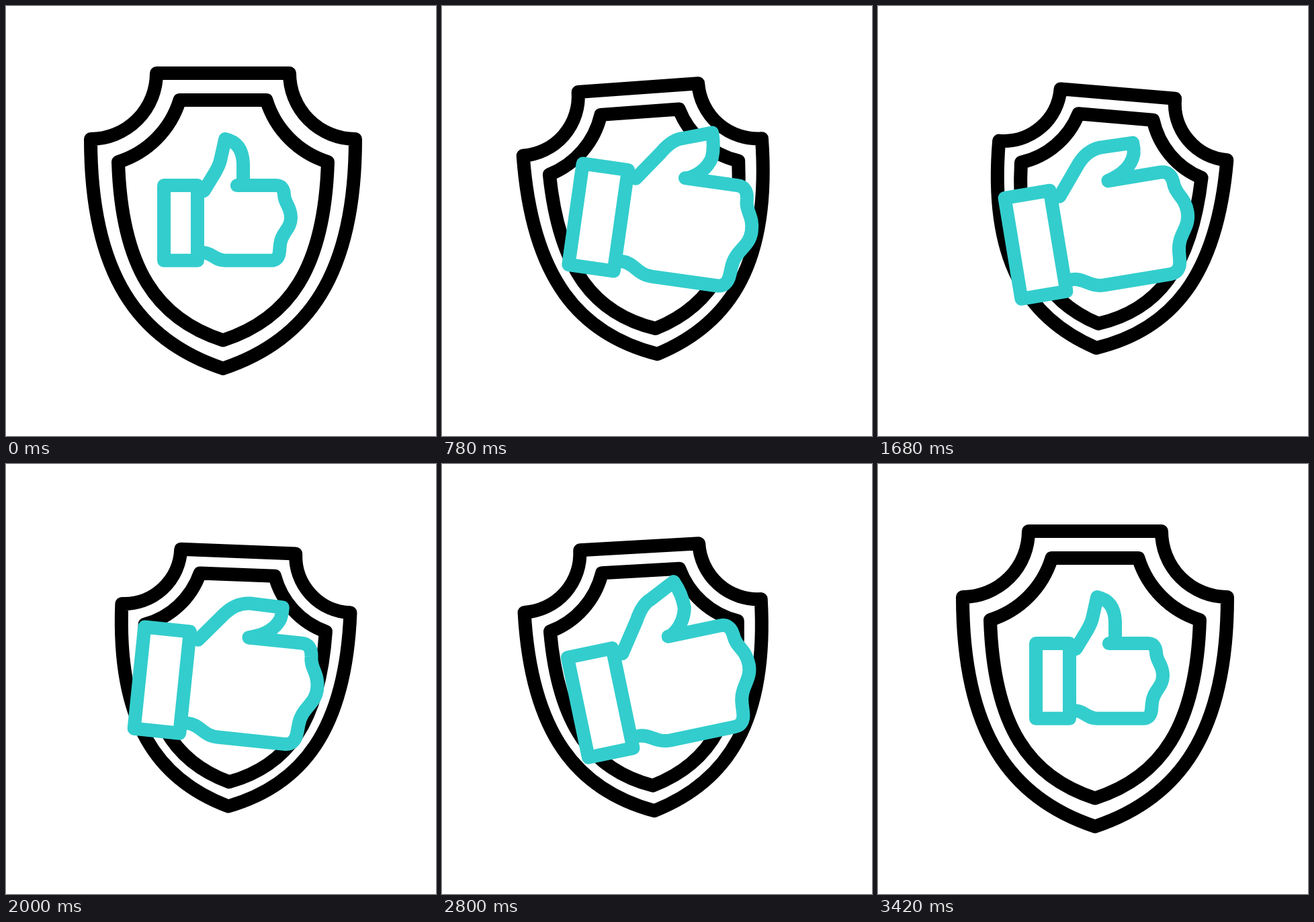
An HTML page with a canvas for the animation above (3600 ms loop, 640 by 640 pixels).

```html
<!DOCTYPE html>
<html lang="en">
<head>
<meta charset="utf-8">
<title>Shield and thumbs up</title>
<style>
html, body { margin: 0; width: 100%; height: 100%; overflow: hidden; background: #fff; }
canvas { display: block; width: 640px; height: 640px; }
</style>
</head>
<body>
<canvas id="stage" width="640" height="640"></canvas>
<script>
const ctx = document.getElementById('stage').getContext('2d');
const LOOP = 3600, STEP = 20, BEGIN = 210, END = 3420;
const TEAL = '#33cdcd', BIG = 1.36;

const mix = (a, b, u) => a + (b - a) * u;
const clamp = u => Math.min(1, Math.max(0, u));
const ease = u => { u = clamp(u); return u * u * (3 - 2 * u); };

// Rises from 0 to 1 at the beginning and falls back before the end.
const ramp = (t, rise, fall) => ease((t - BEGIN) / rise) * ease((END - t) / fall);

// Eases through evenly spaced turning points.
function sway(t, start, gap, ...stops) {
  const k = Math.max(0, (t - start) / gap), last = stops.length - 1;
  const i = Math.min(Math.floor(k), last - 1);
  return mix(stops[i], stops[i + 1], ease(k - i));
}

// Only the geometry is transformed, so the line width stays the same.
function place(path, x, y, deg, scale) {
  const out = new Path2D();
  out.addPath(path, new DOMMatrix().translate(x, y).rotate(deg).scale(scale));
  return out;
}

const shield = new Path2D(
  'M-99-220H99A98 98 0 0 0 197-122C197 81 125 178 0 219.5C-125 178-197 81-197-122A98 98 0 0 0-99-220Z' +
  'M-64.5-180H64.5A139 139 0 0 0 156-88C151 71 98 146 0 177.5C-98 146-151 71-156-88A139 139 0 0 0-64.5-180Z');

const cuff = new Path2D('M-149-71H-81V81H-149Z');

// b = 0: thumb straight up, b = 1: thumb bent forward.
function palm(b) {
  const p = new Path2D(), arc = 4 * b * (1 - b), dx = 8 * b;
  const pt = (x0, y0, x1, y1, bx = 0, by = 0) =>
    [mix(x0, x1, b) + bx * arc, mix(y0, y1, b) + by * arc];
  // thumb
  p.moveTo(-68, -60);
  p.lineTo(...pt(-45.6, -97, -32.5, -103, 0, -3));
  p.quadraticCurveTo(...pt(-37.5, -110.6, -17, -121, 0, -9), ...pt(-34.8, -121.5, 3.5, -122, 0, -9));
  p.lineTo(...pt(-25, -165, 52.5, -121, 5, -13));
  p.quadraticCurveTo(...pt(10, -158, 53, -112), ...pt(11.5, -115, 51, -104));
  p.quadraticCurveTo(...pt(11.5, -90, 42, -80), ...pt(11.5, -71, 7, -71.5));
  // fingers
  p.lineTo(dx - 1, -71);
  p.lineTo(dx + 78, -71);
  p.quadraticCurveTo(dx + 93, -71, dx + 94.4, -53);
  p.bezierCurveTo(dx + 94.4, -34, dx + 108, -30, dx + 108, -6);
  p.bezierCurveTo(dx + 108, 18, dx + 88, 24, dx + 86, 50);
  p.lineTo(dx + 85, 62);
  p.quadraticCurveTo(dx + 83.5, 81, dx + 68, 81);
  p.lineTo(-24, 81);
  p.bezierCurveTo(-46, 81, -52, 65, -70, 65);
  return p;
}

function drawShield(t) {
  const x = sway(t, BEGIN, 802, 323, 302, 344, 302, 323);
  const turn = sway(t, 120, 800, 0, -4.5, 4.9, -4.5, 0);
  ctx.strokeStyle = '#000';
  ctx.stroke(place(shield, x, 320, turn, mix(1, 0.864, ramp(t, 890, 900))));
}

function drawHand(t) {
  const grow = ramp(t, 550, 600);
  const x = mix(344.6, 347.2, grow);
  const y = sway(t, BEGIN, 520, 319.3, 326, 315, 333, 322, 327, 319.3);
  const turn = sway(t, BEGIN, 660, 0, 8.5, -12.4, 10.5, -12.2, 0);
  const pose = [x, y, turn, mix(1 / BIG, 1, grow)];

  const line = palm(ramp(t, 870, 1050));
  const body = new Path2D(line);
  body.lineTo(-81, 65);
  body.lineTo(-81, -60);

  ctx.strokeStyle = TEAL;
  for (const part of [body, cuff]) ctx.fill(place(part, ...pose));
  for (const part of [line, cuff]) ctx.stroke(place(part, ...pose));
}

function draw(t) {
  if (t >= END || t < BEGIN) t = 0;
  ctx.fillStyle = '#fff';
  ctx.fillRect(0, 0, 640, 640);
  ctx.lineWidth = 20;
  ctx.lineJoin = ctx.lineCap = 'round';
  drawShield(t);
  drawHand(t);
}

const start = performance.now();
function tick() {
  const t = (performance.now() - start) % LOOP;
  draw(Math.floor(t / STEP) * STEP);
  requestAnimationFrame(tick);
}
tick();
</script>
</body>
</html>
```
